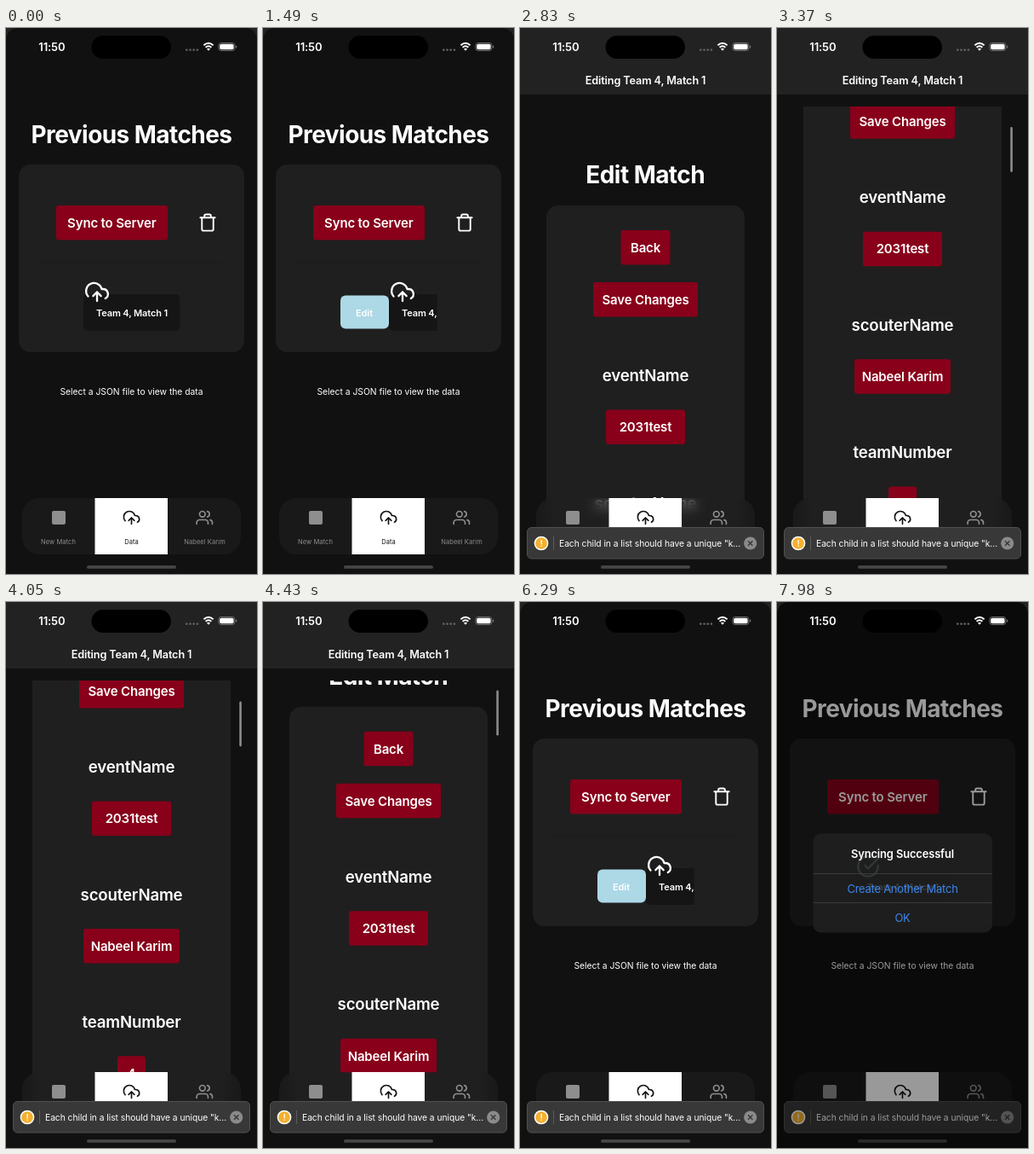
These frames come from a looping animation (295x640 px, 8000 ms). An HTML page:

```html
<!DOCTYPE html>
<html lang="en">
<head>
<meta charset="utf-8">
<title>Previous Matches</title>
<style>
  html, body { margin: 0; width: 100%; height: 100%; overflow: hidden; background: #111; }
  svg { position: absolute; left: 0; top: 0; }
  text { font-family: Inter, "Open Sans", sans-serif; text-anchor: middle; }
  .start { text-anchor: start; }
  .icon { fill: none; stroke-linecap: round; stroke-linejoin: round; stroke-width: 2; }
  #bar {
    position: absolute; left: 19px; top: 551px; width: 257px; height: 66px;
    border-radius: 20px; background: rgba(32, 32, 32, .6);
    backdrop-filter: blur(7px);
  }
</style>
</head>
<body>
<svg id="pages" width="295" height="640"></svg>
<div id="bar"></div>
<svg id="top" width="295" height="640"></svg>
<script>
const LOOP = 8000;
const RED = '#88001a', CARD = '#1f1f1f', BG = '#111';
const $ = id => document.getElementById(id);

// y is the vertical middle of the capitals
const text = (s, x, y, size, weight = 600, fill = '#fff', track = -.01, cls = '') =>
  `<text class="${cls}" x="${x}" y="${y + size * .364}" font-size="${size}" font-weight="${weight}"
    fill="${fill}" letter-spacing="${track}em">${s}</text>`;
const box = (x, y, w, h, r, fill, extra = '') =>
  `<rect x="${x}" y="${y}" width="${w}" height="${h}" rx="${r}" fill="${fill}" ${extra}/>`;
const icon = (body, cx, cy, size, color = '#fff') =>
  `<g class="icon" stroke="${color}" transform="translate(${cx - size / 2} ${cy - size / 2}) scale(${size / 24})">${body}</g>`;
const button = (label, y, w, h = 40.5) =>
  box(147.5 - w / 2, y - h / 2, w, h, 3, RED) + text(label, 147.5, y, 15);
const line = (x1, y1, x2, y2, color) =>
  `<path d="M${x1} ${y1}L${x2} ${y2}" stroke="${color}"/>`;

const CLOUD = '<path d="M16 16l-4-4-4 4M12 12v9M20.39 18.39A5 5 0 0 0 18 9h-1.26A8 8 0 1 0 3 16.3"/>';
const TRASH = '<path d="M3 6h18M19 6v14a2 2 0 0 1-2 2H7a2 2 0 0 1-2-2V6m3 0V4a2 2 0 0 1 2-2h4a2 2 0 0 1 2 2v2"/>';
const USERS = '<path d="M17 21v-2a4 4 0 0 0-4-4H5a4 4 0 0 0-4 4v2M23 21v-2a4 4 0 0 0-3-3.87M16 3.13a4 4 0 0 1 0 7.75"/><circle cx="9" cy="7" r="4"/>';
const CHECK = '<path d="M22 11.08V12a10 10 0 1 1-5.93-9.14M22 4L12 14.01l-3-3"/>';

const listPage = `<g id="list">
  ${box(0, 0, 295, 640, 0, BG)}
  ${text('Previous Matches', 147.5, 124.5, 28, 700, '#fff', -.02)}
  ${box(15, 160, 265, 220, 14, CARD)}
  <g id="sync">${box(59, 208, 131, 40.5, 3, RED)}${text('Sync to Server', 124.3, 228.3, 15)}</g>
  ${icon(TRASH, 237, 228, 23)}
  ${line(35, 274.5, 255, 274.5, '#1b1b1b')}
  <g clip-path="url(#rowClip)">
    <g id="edit">${box(91, 313.5, 57, 39, 6, '#add8e6')}${text('Edit', 119, 333.5, 11)}</g>
    <g id="row">
      ${box(91, 312, 113.5, 43, 5, '#151515')}
      ${text('Team 4, Match 1', 148, 333.5, 11)}
      <g id="cloud">${icon(CLOUD, 107, 309.5, 28)}</g>
      <g id="check">${icon(CHECK, 107, 310, 28, '#a0e0dc')}</g>
    </g>
  </g>
  ${text('Select a JSON file to view the data', 147.5, 426, 10.35, 400, '#fff', -.002)}
</g>`;

const field = (name, value, y, w) => text(name, 147.5, y, 18.7) + button(value, y + 60.5, w);

const editPage = `<g id="editor">
  ${box(0, 0, 295, 640, 0, BG)}
  <g clip-path="url(#scrollClip)"><g id="content">
    ${text('Edit Match', 147.2, 172, 28, 700, '#fff', -.02)}
    ${box(31, 208, 233, 900, 14, CARD)}
    ${button('Back', 257.3, 58)}
    ${button('Save Changes', 318.3, 123)}
    ${field('eventName', '2031test', 407.3, 93)}
    ${field('scouterName', 'Nabeel Karim', 556.8, 113)}
    ${field('teamNumber', '4', 706, 33)}
  </g></g>
  <rect id="thumb" x="274.3" width="2.6" rx="1.3" fill="#8c8c8c"/>
  ${box(0, 0, 295, 78, 0, '#222')}
  ${text('Editing Team 4, Match 1', 147.5, 61, 12.7)}
</g>`;

$('pages').innerHTML = `<defs>
  <clipPath id="rowClip"><rect x="91" y="285" width="113.5" height="75"/></clipPath>
  <clipPath id="scrollClip"><rect y="92" width="295" height="514"/></clipPath>
</defs>${listPage}${editPage}`;

const tabs = `
  ${box(104.5, 551, 85.5, 66, 0, '#fff')}
  ${box(54, 566, 16, 16, 2, '#8e8e8e')}
  ${icon(CLOUD, 147.5, 574, 20, '#111')}
  ${icon(USERS, 233.3, 574, 20, '#8e8e8e')}
  ${text('New Match', 61.5, 602, 7.5, 400, '#8e8e8e', .01)}
  ${text('Data', 147.5, 602, 7.5, 400, '#111', .01)}
  ${text('Nabeel Karim', 233.5, 602, 7.5, 400, '#8e8e8e', .01)}`;

const toast = `<g id="toast">
  ${box(8.5, 585.5, 278, 36.5, 5, '#383838', 'stroke="#505050"')}
  <circle cx="25" cy="604" r="7.6" fill="#f5b02e" stroke="#fff" stroke-width="1.5"/>
  ${text('!', 25, 604, 10, 600)}
  ${line(39.5, 596, 39.5, 612, '#5c5c5c')}
  ${text('Each child in a list should have a unique "k...', 46, 604, 10.3, 400, '#fff', -.005, 'start')}
  <circle cx="270.7" cy="604" r="7.6" fill="#8a8a8a"/>
  <path d="M268 601.3l5.4 5.4m0-5.4l-5.4 5.4" stroke="#383838" stroke-width="1.4"/>
</g>`;

const alertBox = `<g id="alert">
  ${box(42.5, 271.5, 210.5, 116, 9, '#222', 'fill-opacity=".8"')}
  ${line(42.5, 318.5, 253, 318.5, '#3c3c3c')}
  ${line(42.5, 352.5, 253, 352.5, '#3c3c3c')}
  ${text('Syncing Successful', 147.5, 295, 12.9)}
  ${text('Create Another Match', 147.5, 336, 13, 400, '#3c87ee', -.02)}
  ${text('OK', 147.5, 370.5, 13, 400, '#3c87ee', -.02)}
</g>`;

const status = `
  <path d="M0 0H14A14 14 0 0 0 0 14ZM295 0V14A14 14 0 0 0 281 0Z" fill="#232323"/>
  ${box(100.5, 9, 93.5, 27, 13.5, '#000')}
  ${text('11:50', 53.9, 22.3, 13.1)}
  ${[0, 1, 2, 3].map(i => box(211 + i * 4.2, 24.6, 2.6, 2.2, .8, '#666')).join('')}
  <g fill="none" stroke="#fff" stroke-width="1.9">
    <path d="M232.4 20.3Q238 15.2 243.6 20.3M234.6 22.8Q238 19.9 241.4 22.8"/>
  </g>
  <path d="M236 24.6Q238 23 240 24.6L238 26.7Z" fill="#fff"/>
  ${box(249.9, 17.5, 19, 9, 2.8, 'none', 'stroke="#777" stroke-width=".9"')}
  ${box(251.2, 18.8, 16.4, 6.4, 1.7, '#fff')}
  ${box(270, 20.4, 1.2, 3.2, .6, '#777')}`;

$('top').innerHTML = tabs + toast + box(95, 630, 105, 3.8, 1.9, '#464646') +
  '<rect id="dim" width="295" height="640"/>' + alertBox + status;

const el = {};
for (const id of ['list', 'sync', 'edit', 'row', 'cloud', 'check', 'editor', 'content', 'thumb', 'toast', 'dim', 'alert']) el[id] = $(id);

// [first change, last change, number of changes]
const OPEN = [1030, 1490, 7], PUSH = [2080, 2540, 7], POP = [5630, 6100, 7], SYNC = [7520, 7980, 7];
const SCROLLS = [[2980, 3450, 7], [3640, 3640, 1], [3810, 4580, 11], [4650, 5130, 7], [5390, 5390, 1]];

// [time, offset]
const OFFSETS = [[2900, 0], [2980, 14], [3130, 115], [3290, 208], [3450, 246], [3640, 250], [3810, 245],
  [4041, 214], [4300, 128], [4580, 33], [4650, 5], [4730, -13], [4810, -9], [4890, -5], [4970, -2],
  [5130, -1], [5390, 0]];

const count = (t, [a, b, n]) =>
  t < a ? 0 : n === 1 ? 1 : Math.min(n, Math.floor((t - a) / ((b - a) / (n - 1)) + 1e-6) + 1);
const part = (t, span) => count(t, span) / span[2];
const easeOut = p => 1 - (1 - p) ** 3;
const easeBoth = p => p * p * (3 - 2 * p);

// time of the latest scroll step
function held(t) {
  let at = 0;
  for (const s of SCROLLS) {
    const k = count(t, s);
    if (k) at = s[0] + (k - 1) * (s[1] - s[0]) / Math.max(1, s[2] - 1);
  }
  return at;
}

function offsetAt(t) {
  const i = OFFSETS.findIndex(o => o[0] >= t);
  if (i < 0) return 0;
  if (i === 0) return OFFSETS[0][1];
  const [t0, a] = OFFSETS[i - 1], [t1, b] = OFFSETS[i];
  return a + (b - a) * (t - t0) / (t1 - t0);
}

const move = (e, x, y = 0) => e.setAttribute('transform', `translate(${x} ${y})`);
const fade = (e, v) => e.setAttribute('opacity', v);

function draw(t) {
  const synced = count(t, SYNC);

  const open = synced > 1 ? 0 : easeBoth(part(t, OPEN));
  move(el.row, 57 * open);
  fade(el.edit, open > 0 ? 1 : 0);
  fade(el.cloud, synced > 1 ? 0 : 1);
  fade(el.check, synced > 1 ? 1 : 0);
  fade(el.sync, [1, .4, .7][synced] || 1);

  const shown = easeOut(part(t, PUSH)) - easeOut(part(t, POP));
  move(el.list, -88 * shown);
  move(el.editor, 295 * (1 - shown));
  fade(el.editor, shown > 0 ? 1 : 0);
  fade(el.toast, count(t, PUSH) > 2 ? 1 : 0);

  const at = held(t), y = offsetAt(at);
  move(el.content, 0, -y);
  el.thumb.setAttribute('y', 95 + Math.max(0, y) * .1);
  el.thumb.setAttribute('height', 53 + Math.min(0, y) * .7);
  fade(el.thumb, at >= 2980 && at < 5390 ? 1 : 0);

  const a = easeOut(Math.max(0, (synced - 2) / 5));
  const s = 1.15 - .15 * a;
  fade(el.dim, .4 * a);
  fade(el.alert, a);
  el.alert.setAttribute('transform', `translate(147.5 329.5) scale(${s}) translate(-147.5 -329.5)`);
}

const start = performance.now();
function tick() {
  draw((performance.now() - start) % LOOP);
  requestAnimationFrame(tick);
}
tick();
</script>
</body>
</html>
```
